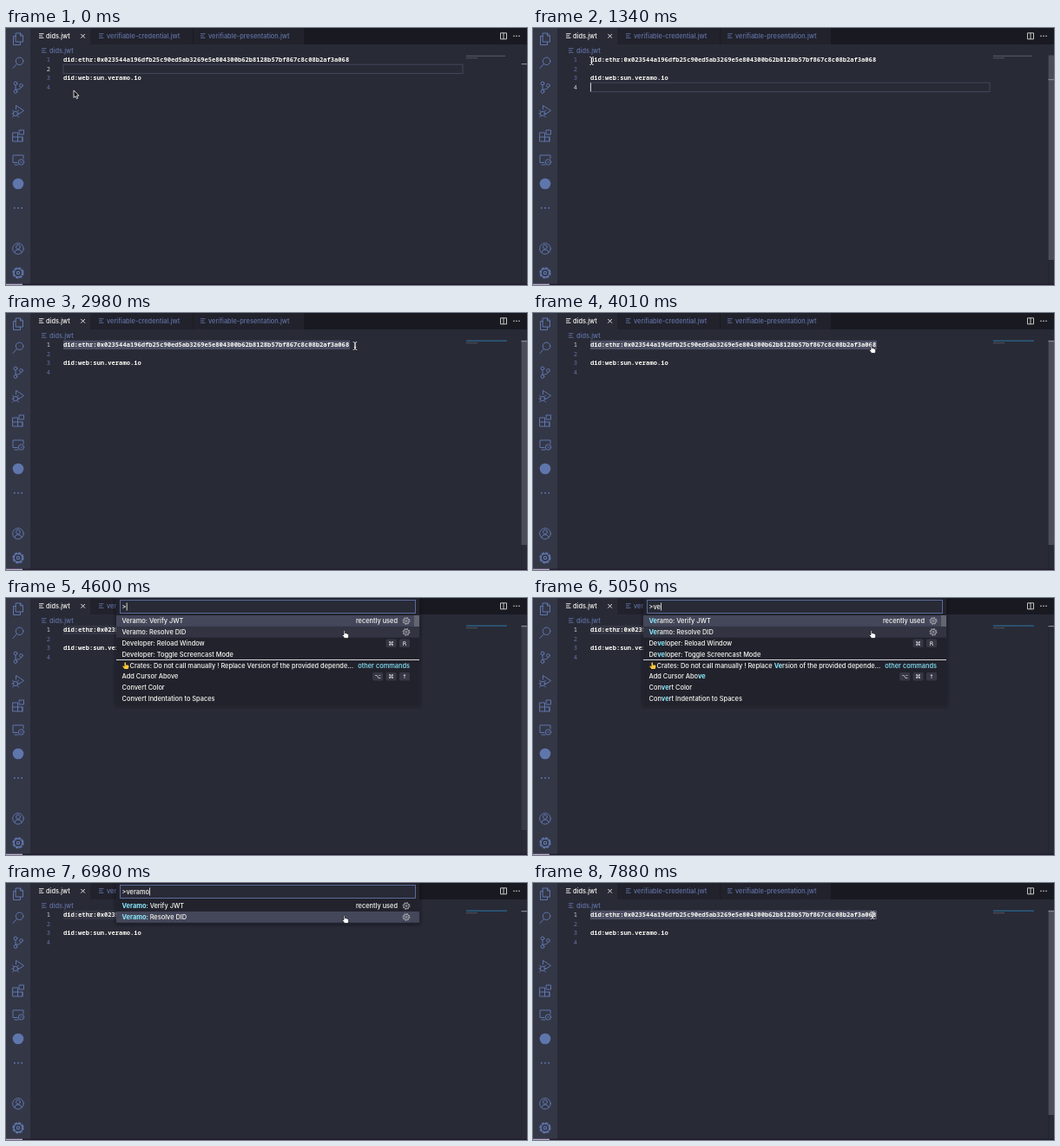
These frames come from a looping animation (600 by 297 pixels, 8000 ms). An HTML page:

```html
<!DOCTYPE html>
<html lang="en">
<head>
<meta charset="utf-8">
<title>Editor demo</title>
<style>
html, body { margin: 0; width: 100%; height: 100%; overflow: hidden; background: #282a36; }
svg { display: block; width: 100vw; height: 100vh; }
text { font: 500 7.4px Inter, sans-serif; fill: #f8f8f2; white-space: pre; }
.dim { fill: #6272a4; }
.code { font: 700 7.143px "Noto Sans Mono", monospace; }
.num { font: 500 7.143px "Noto Sans Mono", monospace; fill: #6272a4; text-anchor: end; }
.num.on { fill: #d4d4d4; }
.hit { fill: #8be9fd; font-weight: 700; }
.other { fill: #8be9fd; }
.end { text-anchor: end; }
.key { font: 6.5px "DejaVu Sans", sans-serif; text-anchor: middle; }
.icons { fill: none; stroke: #5f76ad; stroke-width: 1; stroke-linejoin: round; stroke-linecap: round; }
</style>
</head>
<body>
<svg viewBox="0 0 600 297" preserveAspectRatio="none">
  <defs>
    <g id="lines"><path d="M0 -2.3H5.5M0 0H4M0 2.3H5.5" fill="none" stroke-width=".9"/></g>
    <g id="gear" fill="none">
      <circle r="3.1" stroke-width=".8"/><circle r="1.1" stroke-width=".8"/>
      <circle r="3.9" stroke-width="1" stroke-dasharray="1.53"/>
    </g>
    <filter id="soft" x="-10%" y="-30%" width="120%" height="160%"><feGaussianBlur stdDeviation="2"/></filter>
  </defs>

  <rect width="600" height="297" fill="#282a36"/>
  <rect width="600" height="19" fill="#191a21"/>
  <rect x="97" width="246" height="19" fill="#21222c"/>
  <path d="M215.5 0V19" stroke="#191a21"/>
  <rect x="28" width="69" height="19" fill="#282a36"/>
  <g stroke="#f8f8f2"><use href="#lines" x="38" y="9"/></g>
  <g stroke="#6272a4">
    <use href="#lines" x="107" y="9"/><use href="#lines" x="224" y="9"/><use href="#lines" x="41" y="26"/>
  </g>
  <text x="46" y="11.7">dids.jwt</text>
  <text x="116" y="11.7" class="dim">verifiable-credential.jwt</text>
  <text x="233" y="11.7" class="dim">verifiable-presentation.jwt</text>
  <text x="50" y="28.7" class="dim">dids.jwt</text>
  <path d="M86.3 7l4.6 4.6M90.9 7l-4.6 4.6" stroke="#f8f8f2" stroke-width=".9"/>
  <path d="M569.5 5.8h7v7h-7zM573 5.8v7" fill="none" stroke="#d8d8d4" stroke-width=".9"/>
  <g fill="#d8d8d4"><circle cx="585" cy="9.3" r=".8"/><circle cx="588" cy="9.3" r=".8"/><circle cx="591" cy="9.3" r=".8"/></g>

  <rect width="28" height="297" fill="#343746"/>
  <g class="icons">
    <path d="M11.5 6h5l3 3v7h-8zM16.5 6v3h3M11.5 9.5h-3v10h8v-3"/>
    <path d="M12.5 41.5L8 46.5"/><circle cx="15.6" cy="38.3" r="4.3"/>
    <circle cx="11" cy="64" r="1.9"/><circle cx="11" cy="73.5" r="1.9"/><circle cx="17.5" cy="66.5" r="1.9"/>
    <path d="M11 66V71.5M17.5 68.5q0 2.5-6 2.7"/>
    <path d="M11.5 94v-4.500l9 6-6 4"/><circle cx="11" cy="99" r="2.6"/>
    <path d="M8.500 99H7M15 99h-1.500M9 96.500l-1.500-1.200M13 96.500l1.500-1.200M9 101.500l-1.500 1.300M13 101.500l1.500 1.300"/>
    <path d="M8 121h5.500v10H8zM8 126h11v5H13.500M19 126v5M15.500 118h5v5h-5z"/>
    <path d="M13 155.500H8v-8.500h12v4M10 158h4"/><circle cx="17.500" cy="155" r="3.200"/><path d="M16.500 154l1 1-1 1M18.800 154l-.8 1 .8 1" stroke-width=".6"/>
    <circle cx="14" cy="255" r="6.300"/><circle cx="14" cy="253" r="2.400"/><path d="M9.800 259.500q.7-3.500 4.200-3.500t4.200 3.500"/>
    <use href="#gear" transform="translate(14 283) scale(1.5)"/>
  </g>
  <g fill="#5f76ad">
    <circle cx="14" cy="180" r="6.300"/>
    <circle cx="9.800" cy="208" r=".9"/><circle cx="14" cy="208" r=".9"/><circle cx="18.200" cy="208" r=".9"/>
  </g>
  <rect y="295.700" width="600" height="1.300" fill="#211a2b"/>
  <rect y="295.700" width="19" height="1.300" fill="#bba9c9"/>

  <rect id="band" x="66" width="460" height="10.400" fill="none" stroke="#44475a"/>
  <rect id="sel" x="66" y="31.700" height="10.400"/>
  <g id="code"></g>
  <rect id="caret" width=".8" height="10" fill="#f8f8f2"/>

  <path d="M530 32.300H575" stroke="#8d8f96" stroke-width=".9" stroke-dasharray="1.500 .4" opacity=".75"/>
  <path d="M530 34.700H543" stroke="#8d8f96" stroke-width=".9" stroke-dasharray="1.500 .4" opacity=".6"/>
  <path id="mini" d="M530 32.300H577" stroke="#285a7d" stroke-width="1.600"/>
  <path d="M593.500 31V296" stroke="#22232d" stroke-width=".6"/>
  <rect id="thumb" x="593.500" y="31.500" width="6.500" height="236.500" fill="#4b4d58"/>
  <rect id="mark" x="593.500" width="6.500" height="1.200" fill="#85868c"/>

  <g id="palette"></g>
  <g id="mouse"></g>
</svg>
<script>
const LOOP = 8000, CHAR = 4.286, LEFT = 66, PITCH = 10.5, ROW = 12.85;
const $ = id => document.getElementById(id);
const set = (id, attrs) => { for (const k in attrs) $(id).setAttribute(k, attrs[k]); };
const show = (id, on) => set(id, { visibility: on ? 'visible' : 'hidden' });

const code = ['did:ethr:0x023544a196dfb25c90ed5ab3269e5e804300b62b8128b57bf867c8c08b2af3a068', '', 'did:web:sun.veramo.io', ''];
$('code').innerHTML = code.map((line, i) => {
  const y = 39.2 + i * PITCH;
  return `<text class="num" x="51" y="${y}">${i + 1}</text><text class="code" x="${LEFT}" y="${y}">${line}</text>`;
}).join('');
const nums = document.querySelectorAll('.num');

const shapes = {
  arrow: '<path d="M0 0V8.500L2 6.700 3.400 9.700 4.800 9 3.500 6.200H6Z" fill="#111" stroke="#fff" stroke-width=".8"/>',
  beam: ['#16171d" stroke-width="2', '#f4f4f4" stroke-width=".9'].map(s =>
    `<path d="M-2.300 -4.500Q0 -4.500 0 -3V3Q0 4.500 -2.300 4.500M2.300 -4.500Q0 -4.500 0 -3V3Q0 4.500 2.300 4.500M-1.200 1.500H1.200" fill="none" stroke="${s}"/>`).join(''),
  hand: '<path d="M-2 .3V-3.300Q-1.200 -4.500 -.5 -3.300V-.7Q.6 -1.400 1 -.4 2 -.9 2.300 .1 3.500 -.2 3.600 1V3Q3.300 4.200 2.700 5H-1.200Q-2 3.500 -3.600 1.700 -3.600 .4 -2 1.200Z" fill="#fff" stroke="#15161c" stroke-width=".7"/>'
};

// [time, shape, x, y]
const mouse = [
  [0, 'arrow', 78, 72], [450, 'beam', 80, 76], [750, 'beam', 79, 73], [890, 'beam', 76, 64],
  [1040, 'beam', 72, 52], [1190, 'beam', 69, 42], [1340, 'beam', 67.5, 38],
  [1640, 'beam', 76, 38.5], [1790, 'beam', 140, 40], [1930, 'beam', 235, 41], [2080, 'beam', 315.5, 41],
  [2230, 'beam', 352, 40.5], [2380, 'beam', 378, 40], [2530, 'beam', 396, 39], [2680, 'beam', 405, 38.5],
  [2980, 'beam', 402, 38], [3120, 'beam', 397, 37.5], [3270, 'beam', 392.5, 37], [3410, 'beam', 391, 37],
  [3860, 'hand', 391, 41.5], [7880, 'beam', 391, 37]
];
const line = [[0, 2], [600, 4], [1640, 1]];
const thumb = [[0, 0], [450, 1], [4600, .5], [4750, 0], [7880, 1]];
const query = [[0, null], [4150, ''], [4900, 'v'], [5050, 've'], [5200, 'ver'], [5340, 'vera'], [5490, 'veram'], [5640, 'veramo'], [7880, null]];
const blink = [[0, true], [6080, false], [6680, true], [7130, false], [7580, true]];
const pick = [[0, 0], [6980, 1]];
const step = (table, t) => table.findLast(s => s[0] <= t);
const value = (table, t) => step(table, t)[1];

const commands = [
  { label: 'Veramo: Verify JWT', recent: true },
  { label: 'Veramo: Resolve DID', recent: true },
  { label: 'Developer: Reload Window', recent: true, keys: '⌘R' },
  { label: 'Developer: Toggle Screencast Mode', recent: true },
  { label: 'Crates: Do not call manually ! Replace Version of the provided depende...', point: true },
  { label: 'Add Cursor Above', keys: '⌥⌘↑' },
  { label: 'Convert Color' },
  { label: 'Convert Indentation to Spaces' }
];
const finger = '<path d="M136.500 2.500V-3.200Q137.300 -4 138 -3.200V-.5H140.500Q141.700 0 141.400 1.500L140.600 4H136.500L134.200 1.200Q134.800 0 136.500 1.500Z" fill="#ffc83d"/>';

function mark(label, q) {
  const i = q ? label.toLowerCase().indexOf(q) : -1;
  if (i < 0) return label;
  const j = i + q.length;
  return `${label.slice(0, i)}<tspan class="hit">${label.slice(i, j)}</tspan>${label.slice(j)}`;
}

function row(cmd, i, rows, q, chosen) {
  const y = 26.5 + i * ROW;
  const fill = i === chosen ? '#44475a' : i === 1 ? '#323442' : 'none';
  let out = `<rect x="127" y="${y - ROW / 2}" width="349" height="${ROW}" fill="${fill}"/>`;
  if (cmd.point) out += `<g transform="translate(0 ${y})">${finger}</g>`;
  out += `<text x="${cmd.point ? 142.5 : 133.5}" y="${y + 2.6}">${mark(cmd.label, q)}</text>`;
  if (i === 0) out += `<text class="end" x="451" y="${y + 2.6}">recently used</text>`;
  if (i < 2) out += `<use href="#gear" x="461" y="${y}" stroke="#b9bac0"/>`;
  if (!cmd.recent && rows[i - 1].recent) {
    out += `<path d="M127 ${y - ROW / 2}H476" stroke="#d9d9d9" stroke-width="1"/>`;
    out += `<text class="end other" x="465" y="${y + 2.6}">other commands</text>`;
  }
  [...(cmd.keys || '')].reverse().forEach((key, k) => {
    const x = 459 - k * 15.4;
    out += `<rect x="${x - 6}" y="${y - 4.8}" width="12" height="9.600" rx="1.500" fill="#353744"/>`;
    out += `<text class="key" x="${x}" y="${y + 2.3}">${key}</text>`;
  });
  return out;
}

function drawPalette(q, chosen) {
  if (q === null) { $('palette').innerHTML = ''; return; }
  const rows = commands.filter(c => c.label.toLowerCase().includes(q));
  const height = 21.5 + rows.length * ROW;
  const box = `x="127" y="0" width="349" height="${height}"`;
  $('palette').innerHTML =
    `<rect ${box} fill="#15161c" opacity=".8" filter="url(#soft)"/><rect ${box} fill="#21222c"/>` +
    '<rect x="131.500" y="2.500" width="340" height="15" fill="#282a36" stroke="#6272a4" stroke-width=".9"/>' +
    `<text id="typed" x="133.500" y="12.700">&gt;${q}</text><rect id="bar" y="5.500" width=".8" height="9" fill="#f8f8f2"/>` +
    rows.map((c, i) => row(c, i, rows, q, chosen)).join('') +
    (rows.length > 7 ? '<rect x="470" y="20" width="6" height="13" fill="#63656f"/>' : '');
  set('bar', { x: 133.8 + $('typed').getComputedTextLength() });
}

let drawn = '';
function render(t) {
  const [, shape, x, y] = step(mouse, t);
  $('mouse').innerHTML = shapes[shape];
  set('mouse', { transform: `translate(${x} ${y})` });

  const n = value(line, t), q = value(query, t), chosen = value(pick, t);
  const dragging = t >= 1640 && t < 2530;
  const chars = t < 1640 ? 0 : dragging ? Math.floor((x - 68) / CHAR) : code[0].length;
  nums.forEach((el, i) => el.classList.toggle('on', i + 1 === n));
  set('band', { y: 31.7 + (n - 1) * PITCH });
  show('band', !chars);
  set('sel', { width: chars * CHAR, fill: q === null ? '#4b4e61' : '#343643' });
  set('caret', { x: LEFT + chars * CHAR, y: 31.9 + (n - 1) * PITCH });
  show('caret', t >= 600 && t < 2530);
  show('mini', chars > 0);
  set('thumb', { opacity: value(thumb, t) });
  set('mark', { y: 32 + (n - 1) * 9 });

  const state = q + chosen;
  if (state !== drawn) { drawPalette(q, chosen); drawn = state; }
  if (q !== null) show('bar', value(blink, t));
}

const start = performance.now();
function tick(now) {
  render(Math.max(0, now - start) % LOOP);
  requestAnimationFrame(tick);
}
render(0);
requestAnimationFrame(tick);
</script>
</body>
</html>
```
